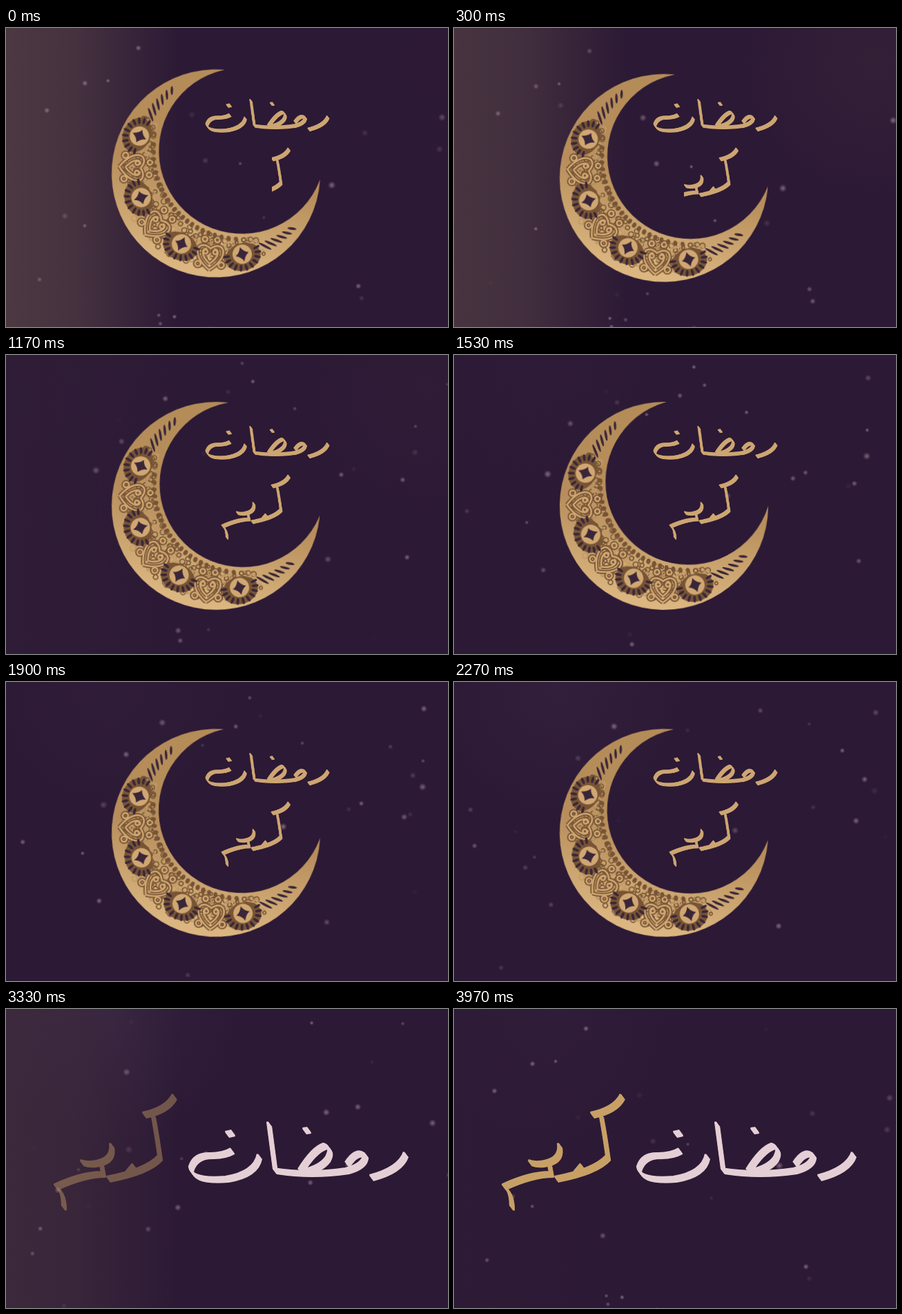
Write an HTML page with a canvas that moves like this. It is 640x434 px and loops after 4010 ms.

```html
<!DOCTYPE html>
<html lang="ar">
<head>
<meta charset="utf-8">
<title>رمضان كريم</title>
<style>
html, body { margin: 0; width: 100%; height: 100%; overflow: hidden; background: #2c1935; }
canvas { display: block; }
</style>
</head>
<body>
<canvas id="stage" width="640" height="434" role="img" aria-label="رمضان كريم"></canvas>
<script>
const W = 640, H = 434, LOOP = 4010, RAD = Math.PI / 180;
const ctx = document.getElementById('stage').getContext('2d');
const ramp = (t, a, b) => Math.max(0, Math.min(1, (t - a) / (b - a)));
const bump = (t, peak, width) => Math.exp(-(((t - peak) / width) ** 2));
const noise = n => {
  const v = Math.sin(n * 91.7 + 3) * 43758.5;
  return v - Math.floor(v);
};

function layer(paint) {
  const c = document.createElement('canvas');
  c.width = W;
  c.height = H;
  paint(c.getContext('2d'));
  return c;
}

// Broad-nib lettering: each stroke is repeated along a slanted nib.
const nib = (strokes, color) => layer(g => {
  g.strokeStyle = color;
  g.lineWidth = 3;
  g.lineJoin = 'round';
  const path = new Path2D(strokes);
  for (let k = -1; k <= 1; k += 0.2) {
    g.setTransform(1, 0, 0, 1, k * 2.6, k * 3.5);
    g.stroke(path);
  }
});

const ramadan = `M579 211Q571 234 529 245
  M494 226Q508 204 521 213Q520 228 494 235Q440 243 390 235L381 167
  M426 236Q446 204 462 199Q474 203 466 218Q456 232 430 237M432 177L439 176
  M367 214Q362 240 320 247Q270 251 268 232Q274 212 298 213Q316 213 328 206M320 182L329 180`;
const kareem = `M244 127Q234 147 200 154M213 154Q218 180 223 216Q205 236 148 247M186 228L176 240
  M153 198Q156 216 140 222Q122 228 110 223M138 224L141 240Q112 240 73 258Q84 266 84 289`;
const GOLD = '#cda672';
const small = [nib(ramadan, GOLD), nib(kareem, GOLD)];
const big = [nib(ramadan, '#e4cfd5'), nib(kareem, '#c7a066')];

// Crescent: outer disc minus an offset inner disc, on a 135 degree axis.
const CX = 304, CY = 219, R = 151, SHIFT = 50, RI = 120.4;
const IX = CX + SHIFT * Math.SQRT1_2, IY = CY - SHIFT * Math.SQRT1_2;
const innerEdge = a => {
  const s = SHIFT * Math.sin(a * RAD);
  return Math.sqrt(RI * RI - s * s) - SHIFT * Math.cos(a * RAD);
};
const middle = a => (R + innerEdge(a)) / 2;

const moon = layer(g => {
  const DARK = '#3a2638', BROWN = '#775434', LIGHT = '#d0a772';

  // Local frame on the band: x along it, y outward.
  const at = (a, r, paint) => {
    g.save();
    g.translate(CX, CY);
    g.rotate((45 + a) * RAD);
    g.translate(0, r);
    paint();
    g.restore();
  };
  const oval = (x, y, rx, ry, turn = 0) => {
    g.beginPath();
    g.ellipse(x, y, rx, ry, turn, 0, 7);
    g.fill();
  };
  const disc = (x, y, r) => oval(x, y, r, r);
  const ring = (x, y, r) => {
    g.beginPath();
    g.arc(x, y, r, 0, 7);
    g.stroke();
  };
  const star = () => {
    g.fillStyle = BROWN;
    oval(0, 4, 26, 20);
    g.fillStyle = LIGHT;
    disc(0, 0, 14);
    g.fillStyle = DARK;
    g.fill(new Path2D('M0-11Q3-3 10 0Q3 3 0 11Q-3 3-10 0Q-3-3 0-11'));
    for (let a = -100; a <= 100; a += 20) {
      oval(Math.sin(a * RAD) * 23, Math.cos(a * RAD) * 20, 2, 5, -a * RAD);
    }
  };
  const heart = () => {
    const path = new Path2D('M0 23C-31 1-18-22 0-8C18-22 31 1 0 23M0 14C-15 2-12-9-5-7M0 14C15 2 12-9 5-7');
    [[BROWN, 6], [LIGHT, 2.5]].forEach(([color, width]) => {
      g.strokeStyle = color;
      g.lineWidth = width;
      g.stroke(path);
      [-1, 1].forEach(s => { ring(s * 7, -3, 3); ring(s * 17, 15, 4); ring(s * 9, -21, 3.5); });
    });
  };

  const gold = g.createLinearGradient(225, 350, 260, 80);
  gold.addColorStop(0, '#dbb680');
  gold.addColorStop(0.5, '#b78e5b');
  gold.addColorStop(1, '#b48c58');
  g.fillStyle = gold;
  disc(CX, CY, R);
  g.globalCompositeOperation = 'destination-out';
  disc(IX, IY, RI);
  g.globalCompositeOperation = 'source-atop';

  // Lace of small curls, kept inside a plain rim.
  for (let n = 0; n < 420; n++) {
    const a = (noise(n) - 0.5) * 160, low = innerEdge(a) + 9;
    at(a, low + noise(n + 500) * (R - 15 - low), () => {
      g.strokeStyle = n % 2 ? BROWN : '#bf9865';
      g.lineWidth = 1.6;
      ring(0, 0, 2 + 2 * noise(n + 900));
    });
  }
  [-45, 0, 45].forEach(a => at(a, middle(a) + 2, heart));
  [-67, -23, 23, 67].forEach(a => at(a, middle(a) + 2, star));
  g.fillStyle = BROWN;
  for (let a = -66; a <= 66; a += 6) {
    at(a, innerEdge(a) + 9, () => oval(0, 0, 3, 4));
  }
  g.fillStyle = DARK;
  for (let a = 83; a <= 103; a += 4) {
    [-1, 1].forEach(s => at(s * a, middle(a), () => oval(0, 0, 1.8, (R - innerEdge(a)) * 0.22, s * 0.5)));
  }
});

function glow(x, y, r, rgb, alpha) {
  const g = ctx.createRadialGradient(x, y, 0, x, y, r);
  g.addColorStop(0, `rgba(${rgb},${alpha})`);
  g.addColorStop(1, `rgba(${rgb},0)`);
  ctx.fillStyle = g;
  ctx.fillRect(x - r, y - r, 2 * r, 2 * r);
}

// Each star lives three times per loop, at a new place each time.
function drawStars(t) {
  for (let n = 1; n <= 26; n++) {
    const phase = t / LOOP * 3 + noise(n), life = phase % 1;
    const seed = n + 100 * (Math.floor(phase) % 3);
    const x = noise(seed + 0.3) * W + life * 20, y = noise(seed + 0.6) * H + life * 20;
    glow(x, y, 3 + 3 * noise(n + 50), '180,150,165', 0.65 * Math.sin(life * Math.PI));
  }
}

function drawSky(t) {
  ctx.fillStyle = '#2c1935';
  ctx.fillRect(0, 0, W, H);
  const dust = bump(t, 0, 750) + 0.5 * bump(t, 3330, 400);
  const left = ctx.createLinearGradient(0, 0, 250, 0);
  left.addColorStop(0, `rgba(78,58,66,${dust * 0.95})`);
  left.addColorStop(0.4, `rgba(78,58,66,${dust * 0.75})`);
  left.addColorStop(1, 'rgba(78,58,66,0)');
  ctx.fillStyle = left;
  ctx.fillRect(0, 0, 250, H);
  glow(610, 50, 200, '82,60,64', 0.6 * bump(t, 670, 350));
  glow(150, 10, 190, '66,48,78', 0.4 * bump(t, 2900, 1000));
  drawStars(t);
}

function word(img, x, y, sx, sy, from = 0) {
  ctx.drawImage(img, from, 0, W - from, H, x + from * sx, y, (W - from) * sx, H * sy);
}

function draw(now) {
  const t = now % LOOP;
  drawSky(t);

  const night = 1 - ramp(t, 2700, 2850);
  const swing = 3 - 3 * Math.cos((t - 670) / 965 * 2 * Math.PI);
  const lift = -8 * (1 - ramp(t, 0, 500)) ** 2;
  ctx.globalAlpha = night;
  ctx.save();
  ctx.translate(CX, CY + lift);
  ctx.rotate(swing * RAD);
  ctx.drawImage(moon, -CX, -CY);
  ctx.restore();
  word(small[0], 139.7, 14, 0.564, 0.545);
  word(small[1], 272.8, 105, 0.562, 0.557, 200 - 140 * ramp(t, 0, 450));

  ctx.globalAlpha = ramp(t, 2820, 3100);
  ctx.drawImage(big[0], 0, 0);
  ctx.globalAlpha = ramp(t, 3190, 3510);
  ctx.drawImage(big[1], 0, 0);
  ctx.globalAlpha = 1;
  requestAnimationFrame(draw);
}
requestAnimationFrame(draw);
</script>
</body>
</html>
```
